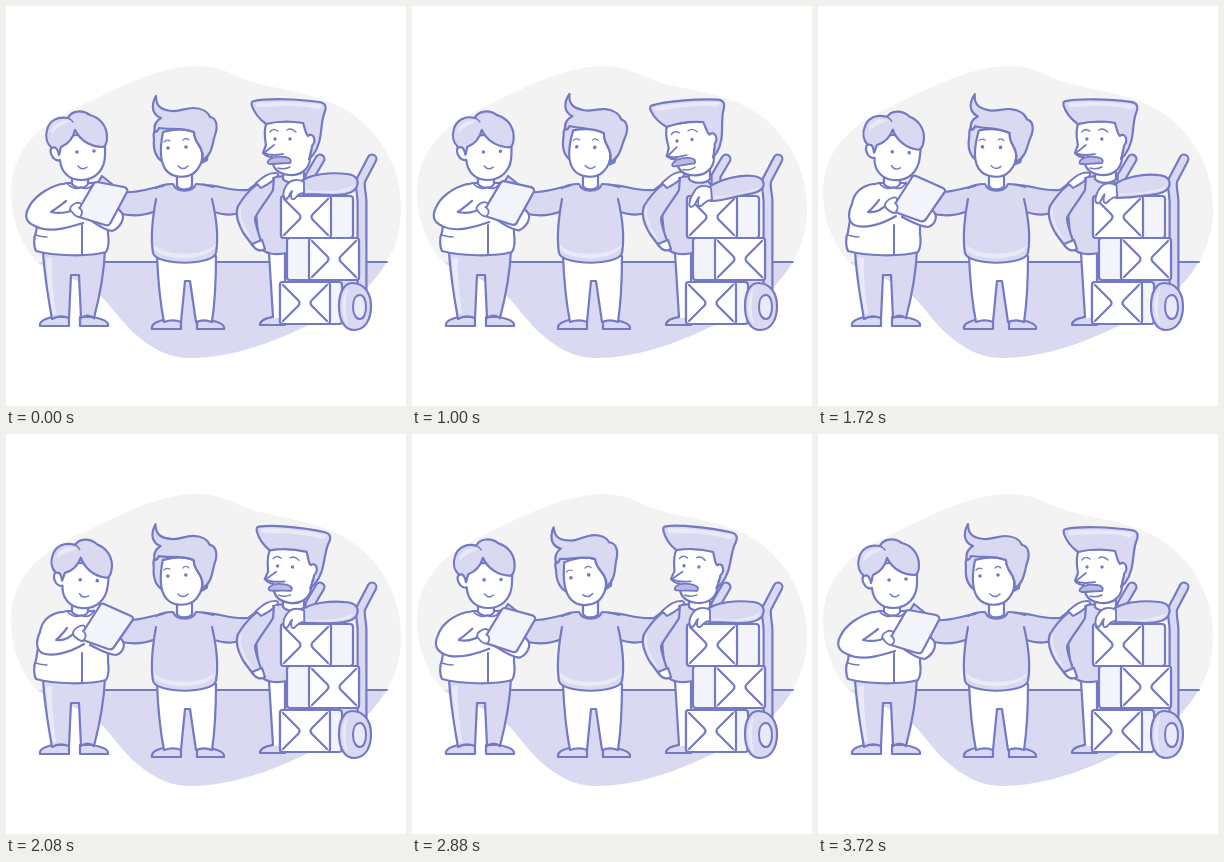
Write an HTML page with a canvas that moves like this. It is 400 px wide and 400 px high and loops after 4000 ms.

```html
<!DOCTYPE html>
<html lang="en">
<head>
<meta charset="utf-8">
<title>Delivery team</title>
<style>
html, body { margin: 0; width: 100%; height: 100%; overflow: hidden; background: #fff; }
canvas { display: block; width: 400px; height: 400px; }
</style>
</head>
<body>
<canvas id="stage"></canvas>
<script>
const LOOP = 4000;
const LINE = '#7479c3', FILL = '#d9d9f2', PALE = '#e9e9f8', FAINT = '#f3f3fa', WHITE = '#fff', GREY = '#f3f3f3';
const canvas = document.getElementById('stage');
const ctx = canvas.getContext('2d');
const ratio = window.devicePixelRatio || 1;
canvas.width = canvas.height = 400 * ratio;

// Keyframes are [time, value] pairs joined by a sine ease.
const tracks = {
  midHead: [[280, 0], [1240, 1], [1460, 1], [2660, -1], [2960, -1], [3720, 0]],
  rightHead: [[200, 0], [740, -1], [1000, -1], [2440, 0.92], [2600, 0.92], [3520, 0]],
  rightArm: [[200, 0], [960, 1], [1160, 1], [2360, 0]],
  left: [[760, 0], [1760, 1], [2440, 1], [3160, 0]]
};

function valueAt(keys, t) {
  if (t <= keys[0][0]) return keys[0][1];
  for (let i = 1; i < keys.length; i++) {
    const [t0, v0] = keys[i - 1], [t1, v1] = keys[i];
    if (t < t1) return v0 + (v1 - v0) * (1 - Math.cos(Math.PI * (t - t0) / (t1 - t0))) / 2;
  }
  return keys[keys.length - 1][1];
}

// Blends two paths that share the same commands.
function blend(a, b, k) {
  const ends = b.match(/-?[\d.]+/g);
  let i = 0;
  return a.replace(/-?[\d.]+/g, n => (+n + (ends[i++] - n) * k).toFixed(2));
}

function shape(d, fill, width = 2.2) {
  const path = new Path2D(d);
  if (fill) { ctx.fillStyle = fill; ctx.fill(path); }
  if (width) { ctx.lineWidth = width; ctx.strokeStyle = LINE; ctx.stroke(path); }
}
const line = (d, width = 2) => shape(d, null, width);
const tint = (d, color = PALE) => shape(d, color, 0);

function dot(x, y, r = 1.8) {
  ctx.beginPath();
  ctx.arc(x, y, r, 0, 7);
  ctx.fillStyle = LINE;
  ctx.fill();
}

function turned(x, y, angle, draw) {
  ctx.save();
  ctx.translate(x, y);
  ctx.rotate(angle);
  ctx.translate(-x, -y);
  draw();
  ctx.restore();
}

function backdrop() {
  const blob = new Path2D('M5 186 C6 142 34 119 72 101 C112 82 148 62 188 60 C219 59 228 72 254 78 C292 87 328 91 354 114 C383 139 396 172 395 207 C394 226 389 243 380 257 C362 287 340 299 316 312 C275 334 228 352 184 352 C160 352 143 340 128 327 C110 311 101 290 78 278 C60 269 39 264 29 254 C13 235 5 211 5 186Z');
  ctx.save();
  ctx.clip(blob);
  ctx.fillStyle = GREY;
  ctx.fillRect(0, 0, 400, 256);
  ctx.fillStyle = FILL;
  ctx.fillRect(0, 256, 400, 144);
  ctx.restore();
  line('M38 256 H381', 1.8);
}

function middleBody() {
  shape('M157 314 C150 316 145 318 146 323 H175 V314Z', FILL);
  shape('M191 314 V323 H218 C219 318 212 316 204 314Z', FILL);
  shape('M151 250 C152 274 154 296 158 316 C164 314 170 314 175 316 L179 275 H184 L190 316 C195 314 201 314 206 316 C209 296 210 274 210 250Z', WHITE);
  shape('M165 179 C147 180 134 188 116 186 L96 170 L91 178 L112 207 C126 211 140 209 150 205Z', FILL);
  shape('M192 179 C211 177 222 186 242 184 L256 173 L262 187 L244 201 C230 212 217 209 205 205Z', FILL);
  shape('M166 178 C154 179 150 188 148 202 C145 219 145 235 147 247 C151 260 206 260 210 247 C213 229 211 211 208 200 C205 186 202 179 191 178Z', FILL, 0);
  line('M150 193 C146 215 145 235 147 247 C151 260 206 260 210 247 C213 229 210 210 206 193 M150 182 C155 179 161 178 166 178 M191 178 C197 178 202 179 207 181', 2.2);
  tint('M148 238 C157 251 199 251 210 238 L209 241 C200 256 156 255 148 243Z');
  shape('M171 166 V180 C174 185 184 184 186 180 V166Z', WHITE);
  line('M167 178 C170 187 187 187 190 178');
}

function middleHead() {
  shape('M157 156 C149 151 147 143 148 133 C147 127 148 123 152 122 C157 117 182 111 199 113 L205 126 L201 154 L190 160Z', FILL);
  shape('M157 126 C154 141 153 155 160 164 C167 173 184 173 191 164 C195 159 197 152 196 146 C195 139 188 136 188 126 C178 122 167 123 157 126Z', WHITE);
  shape('M150 90 C150 102 157 104 166 105 C173 106 179 102 187 102 C196 102 202 106 204 111 C211 112 212 121 209 129 C206 138 207 148 196 155 C197 151 197 148 196 146 C195 139 188 136 188 126 C177 121 162 124 153 122 C152 125 151 126 149 126 C147 119 151 114 155 112 C147 109 144 101 150 90Z', FILL);
  dot(162, 142); dot(180, 141);
  line('M158 136 Q161 133 164 135 M177 134 Q180 131 183 134', 1.2);
  line('M172 160 Q177 165 182 160', 1.5);
}

function rightBody(arm) {
  shape('M263 247 L267 311 C261 312 254 314 254 319 H279 V245Z', WHITE);
  tint('M255 318 C257 314 264 312 270 312 H277 V318Z', FILL);
  line('M267 311 C261 312 254 314 254 319 H278');
  shape('M266 171 C253 173 249 188 250 207 L253 239 C257 249 271 249 281 247 L300 205 L300 180 C295 172 285 169 266 171Z', FILL);
  shape('M268 171 C251 174 240 187 232 200 C229 208 232 218 238 228 L247 240 L255 235 C252 225 249 218 249 212 C254 202 262 193 267 184Z', FILL);
  tint('M238 197 C232 204 235 215 243 228 L246 235 C239 228 231 211 233 203Z');
  shape('M246 238 C249 244 254 246 259 243 L256 234Z', WHITE);
  shape('M277 161 V173 C281 178 294 178 298 173 V159Z', WHITE);
  // The neighbour's hand rests on the shoulder.
  const top = 167 - arm;
  shape(`M250 177 C256 172 261 ${top} 269 ${top} C274 ${top} 273 171 267 172 C269 174 264 177 255 182Z`, WHITE, 1.9);
}

function rightHead() {
  shape('M261 116 C257 124 259 133 260 139 L257 147 C260 150 263 151 266 151 C266 162 272 168 283 169 C294 170 303 164 304 153 L305 145 C311 141 311 130 305 126 L303 115Z', WHITE);
  shape('M248 95 C261 92 293 93 313 96 C320 97 321 101 318 108 C314 119 317 136 307 149 L303 153 C305 147 306 143 306 140 C311 134 307 126 302 130 C299 127 299 122 297 117 C286 115 272 115 260 118 C252 112 248 106 246 100 C245 97 246 95 248 95Z', FILL);
  tint('M250 97 C266 95 297 96 316 99 C316 102 314 103 310 103 C290 98 268 101 251 101Z');
  line('M264 126 C266 123 269 123 272 125 M281 124 C284 122 287 123 290 126', 1.4);
  dot(269, 133, 1.7); dot(284, 133, 1.7);
  shape('M268 139 L258 147 C264 150 270 149 277 148', WHITE, 1.8);
  shape('M262 155 C265 151 271 150 279 151 C284 152 286 154 284 157 C278 157 270 158 264 158 C262 158 261 157 262 155Z', '#b9bbe3', 1.8);
  line('M272 162 Q278 164 284 161', 1.5);
}

function box(x, y, w, h, fill) {
  const path = new Path2D();
  path.roundRect(x, y, w, h, 3);
  shape(path, fill);
}

// A crate shows a wide face with two facing flaps and a narrow side.
function crate(x, y, left, width) {
  box(left, y, width, 42, FAINT);
  box(x, y, 50, 42, WHITE);
  const flap = (edge, dir) => {
    const px = d => edge + dir * d;
    line(`M${px(3)} ${y + 3} L${px(18)} ${y + 18} Q${px(21)} ${y + 21} ${px(18)} ${y + 24} L${px(3)} ${y + 39}`, 2.2);
  };
  flap(x, 1);
  flap(x + 50, -1);
}

function tube(d) {
  const path = new Path2D(d);
  for (const [width, color] of [[11, LINE], [6.6, FILL]]) {
    ctx.lineWidth = width;
    ctx.strokeStyle = color;
    ctx.stroke(path);
  }
}

function cart() {
  tube('M314 153 L304 170 V190');
  tube('M366 153 L355 174 C353 179 356 188 356 196 V286');
  crate(275, 190, 275, 72);
  crate(303, 232, 281, 72);
  crate(274, 276, 274, 62);
  shape('M346 277 C338 277 333 287 333 300 C333 315 339 324 348 324 C359 324 365 314 365 300 C365 287 358 277 346 277Z', FILL);
  tint('M342 282 C334 291 335 310 342 319 C339 306 339 294 342 282Z');
  shape('M354 289 C349 289 347 295 347 301 C347 308 350 313 354 313 C358 313 360 307 360 301 C360 295 358 289 354 289Z', PALE, 2);
}

function rightArm(k) {
  shape(blend(
    'M295 176 C303 168 325 166 341 168 C350 169 353 174 351 180 C349 187 340 189 327 189 C316 189 306 188 297 188Z',
    'M296 182 C306 174 327 168 341 170 C350 171 353 176 351 181 C348 187 338 188 327 190 C316 193 307 195 299 195Z', k), FILL);
  tint(blend(
    'M300 184 C317 187 334 186 348 179 C347 185 336 187 325 187 C315 187 306 186 300 186Z',
    'M302 191 C317 189 334 187 348 181 C346 185 336 186 325 188 C315 190 307 192 302 193Z', k));
  shape(blend(
    'M298 176 C291 172 284 174 280 180 C276 186 277 192 280 193 C283 193 283 187 286 185 C284 190 285 194 288 193 C291 191 292 187 298 187Z',
    'M299 182 C292 178 285 180 282 186 C277 194 276 200 279 201 C283 201 284 195 287 191 C285 197 286 201 289 200 C292 198 294 194 300 194Z', k), WHITE, 1.9);
}

function leftBody() {
  shape('M46 311 C39 313 33 315 34 320 H63 V311Z', FILL);
  shape('M74 311 V320 H102 C103 315 96 313 87 311Z', FILL);
  shape('M37 244 C38 268 42 290 46 313 C52 309 58 310 63 312 L65 269 H73 L75 312 C79 309 84 309 88 312 C94 289 98 267 99 244Z', FILL);
  tint('M40 252 H46 C45 272 48 291 50 308 H47 C43 291 41 272 40 252Z');
  shape('M61 177 C44 180 36 190 33 208 L30 226 C27 233 28 241 30 245 C48 250 82 251 100 246 C103 241 103 234 102 228 L102 206 C101 191 98 181 86 177Z', WHITE);
  line('M30 229 Q35 231 41 231', 1.6);
  line('M76 219 V249');
  shape('M66 166 V178 C70 183 79 183 82 178 V166Z', WHITE);
  line('M61 177 C67 184 73 183 75 181 C80 184 86 182 88 176', 1.7);
}

function leftHead() {
  shape('M51 130 L52 140 C45 137 43 145 46 150 C48 154 52 155 54 154 C55 166 63 174 75 174 C90 174 99 163 99 149 L99 128Z', WHITE);
  shape('M46 142 C41 138 39 131 41 124 C43 115 51 110 62 112 C65 105 76 103 84 109 C95 112 101 121 101 131 C101 137 100 140 97 141 C84 141 74 134 69 124 C67 133 62 138 55 141 C54 144 54 147 53 149 C52 144 50 140 46 142Z', FILL);
  tint('M45 124 C49 116 57 114 64 115 C59 119 51 120 46 128Z');
  line('M62 112 C64 113 66 114 67 116', 1.5);
  dot(71, 146); dot(88, 145);
  line('M72 160 Q76 165 81 161', 1.5);
}

function leftArms(k) {
  shape(blend(
    'M99 181 C105 190 108 199 116 207 C119 213 114 222 106 225 C98 224 90 218 83 213Z',
    'M97 184 C104 190 109 198 116 206 C120 211 117 219 110 221 C102 221 92 215 84 211Z', k), WHITE);
  shape(blend(
    'M55 178 C41 182 27 191 22 203 C18 211 21 217 29 220 C42 227 58 223 77 217 L70 203 C61 207 53 208 45 206 L60 195Z',
    'M55 178 C44 180 36 186 34 198 C30 207 30 215 36 219 C46 223 63 219 78 210 L70 197 C64 204 57 207 50 206 L60 195Z', k), WHITE, 0);
  line(blend(
    'M55 178 C41 182 27 191 22 203 C18 211 21 217 29 220 C42 227 58 223 77 217 M70 203 C61 207 53 208 45 206 C51 202 56 198 60 195',
    'M55 178 C44 180 36 186 34 198 C30 207 30 215 36 219 C46 223 63 219 78 210 M70 197 C64 204 57 207 50 206 C55 202 58 198 61 194', k), 2.2);
  shape(blend(
    'M91 176 L118 181 C121 182 122 184 121 186 L105 216 C104 219 102 220 99 219 L73 211 C70 210 70 208 71 206 L87 179 C88 177 89 176 91 176Z',
    'M98 170 L125 182 C127 183 128 185 126 187 L108 213 C107 215 105 216 102 215 L77 206 C74 205 74 203 75 201 L93 173 C94 170 96 169 98 170Z', k), FAINT);
  shape(blend(
    'M66 206 C62 203 65 199 70 197 C75 196 77 199 73 202 C77 204 77 208 74 211 C71 211 68 209 66 206Z',
    'M68 202 C65 198 69 194 74 192 C79 190 81 194 77 197 C81 200 80 204 77 207 C74 207 71 205 68 202Z', k), WHITE, 1.8);
}

function render(t) {
  const pose = {};
  for (const name in tracks) pose[name] = valueAt(tracks[name], t);
  ctx.setTransform(ratio, 0, 0, ratio, 0, 0);
  ctx.fillStyle = WHITE;
  ctx.fillRect(0, 0, 400, 400);
  ctx.lineJoin = ctx.lineCap = 'round';
  backdrop();
  middleBody();
  turned(177, 172, 0.105 * pose.midHead, middleHead);
  rightBody(pose.rightArm);
  turned(286, 171, 0.105 * pose.rightHead, rightHead);
  cart();
  rightArm(pose.rightArm);
  leftBody();
  turned(75, 174, 0.115 * pose.left, leftHead);
  leftArms(pose.left);
}

function tick() {
  render(performance.now() % LOOP);
  requestAnimationFrame(tick);
}
tick();
</script>
</body>
</html>
```
